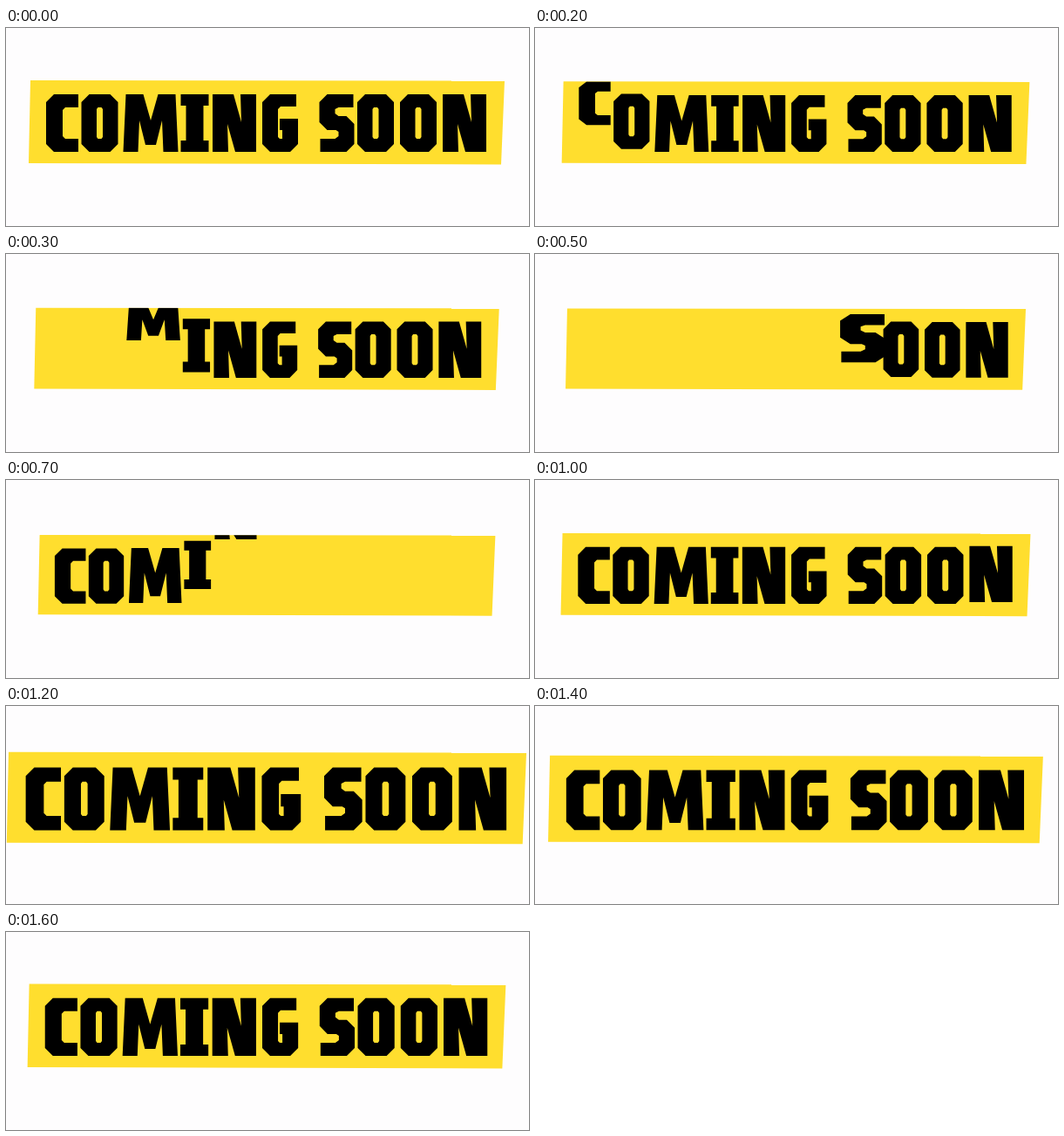
Write an HTML page that moves like this. It is 600 by 227 pixels and loops after 1700 ms.

```html
<!DOCTYPE html>
<html lang="en">
<head>
<meta charset="utf-8">
<title>Coming soon</title>
<style>
html, body { margin: 0; width: 100%; height: 100%; overflow: hidden; background: #fefdfe; }
svg { display: block; width: 100vw; height: 100vh; }
</style>
</head>
<body>
<svg viewBox="0 0 600 227" role="img" aria-label="COMING SOON">
  <defs>
    <clipPath id="clip"><path d="M28 59.9 572 60.6 568 156.4 26 155Z"/></clipPath>
  </defs>
  <g id="banner">
    <path d="M28 59.9 572 60.6 568 156.4 26 155Z" fill="#ffde2e"/>
    <g id="word" clip-path="url(#clip)"></g>
  </g>
</svg>
<script>
const GLYPHS = {
  C: 'M9 0H37V15H22L19 18V48L22 51H37V66H9L0 57V9Z',
  O: 'M9 0H33L42 9V57L33 66H9L0 57V9ZM19 15L17.5 17V49L19 51H23L24.5 49V17L23 15Z',
  M: 'M3 0H23L31.5 30 40 0H60L63 66H46L44.5 30 37.5 58H25.5L18.5 30 17 66H0Z',
  I: 'M0 0H32V13H26V53H32V66H0V53H6V13H0Z',
  N: 'M0 0H24L33 32 32 0H50V66H26L17 34 18 66H0Z',
  G: 'M9 0H39V14H21L18 17V49L20 51H23V41H20V28H41V57L32 66H9L0 57V9Z',
  S: 'M9 0H39V15H22L18 17V22L22 25H31L40 34V57L31 66H1V51H18L22 48V43L19 41H9L0 32V9Z'
};
const TEXT = 'COMING SOON';
const LEFT = [46, 86.5, 134.5, 200.5, 237, 294, 0, 359.5, 403, 452, 501];
const STEP = 100, LOOP = 1700;
const CAP_TOP = 76, VANISH_Y = 7, SPREAD = 3.1;

// Banner size at each step
const ZOOM = [1, .992, .983, .977, .972, .967, .963, .961, .966, .975,
  .987, 1.04, 1.092, 1.07, 1.04, 1.018, 1.005];

const banner = document.getElementById('banner');
const word = document.getElementById('word');
const clamp = v => Math.min(1, Math.max(0, v));

const letters = [];
[...TEXT].forEach((ch, i) => {
  if (ch === ' ') return;
  const el = document.createElementNS('http://www.w3.org/2000/svg', 'path');
  el.setAttribute('d', GLYPHS[ch]);
  el.setAttribute('fill-rule', 'evenodd');
  word.append(el);
  letters.push({ el, i, x: LEFT[i], widen: ch === 'S' ? 2.6 : 0 });
});

function draw(k) {
  const z = ZOOM[k];
  banner.setAttribute('transform', `translate(300 137) scale(${z}) translate(-300 -137)`);

  // A gap sweeps along the word: letters shrink upwards, then drop back
  const front = 2.23 * k - 2.56;
  const back = 2.6 * k - 16.77;
  for (const { el, i, x, widen } of letters) {
    const lift = clamp(Math.min(front - i, i - back) / SPREAD) ** 3;
    const sy = 1 - lift, sx = 1 + widen * Math.min(lift, .15);
    const y = VANISH_Y + (CAP_TOP - VANISH_Y) * sy;
    const left = x - 22 * (sx - 1);
    el.setAttribute('transform', `translate(${left} ${y}) scale(${sx} ${sy})`);
  }
}

const start = performance.now();
function tick() {
  draw(Math.floor((performance.now() - start) % LOOP / STEP));
  requestAnimationFrame(tick);
}
tick();
</script>
</body>
</html>
```
